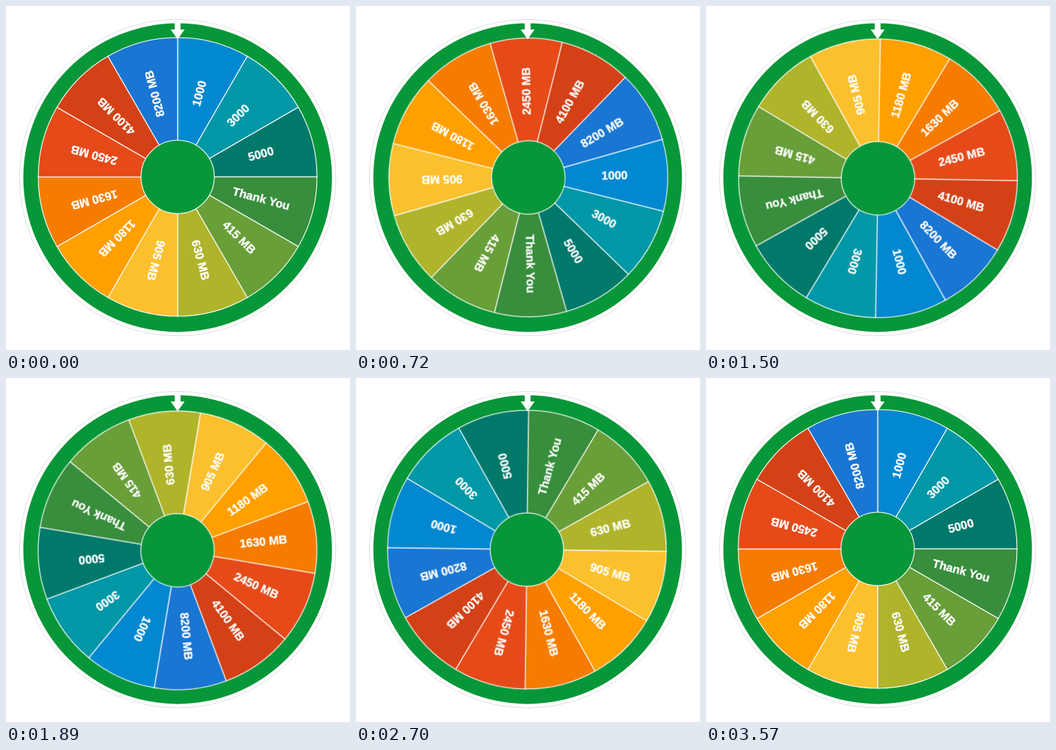
An HTML page for the animation above (3.6 s loop, 469 by 469 pixels).

```html
<!DOCTYPE html>
<html lang="en">
<head>
<meta charset="utf-8">
<title>Prize wheel</title>
<style>
  html, body { margin: 0; width: 100%; height: 100%; overflow: hidden; background: #fff; }
  svg { display: block; width: 469px; height: 469px; }
  .wheel { transform-origin: 0 0; animation: spin 3600ms infinite; }
  .wedge, .hub { stroke: #fff; stroke-width: 1.1; }
  .ring, .hub { fill: #079738; }
  .rim { fill: none; stroke: #ccc; stroke-width: .6; }
  text {
    font: bold 16px "Liberation Sans", Arial, sans-serif;
    fill: #fff; stroke: #fff; stroke-width: .35; text-anchor: middle;
  }

  /* one step every 30 ms, slightly slower through the middle of the turn */
  @keyframes spin {
    0%       { transform: rotate(0deg);     animation-timing-function: steps(15); }
    12.5%    { transform: rotate(46.6deg);  animation-timing-function: steps(18); }
    27.5%    { transform: rotate(101.6deg); animation-timing-function: steps(17); }
    41.6667% { transform: rotate(151deg);   animation-timing-function: steps(26); }
    63.3333% { transform: rotate(228.1deg); animation-timing-function: steps(28); }
    86.6667% { transform: rotate(313.4deg); animation-timing-function: steps(15); }
    99.1667%, 100% { transform: rotate(360deg); }
  }
</style>
</head>
<body>
<svg viewBox="0 0 469 469">
  <g transform="translate(234 234)">
    <circle class="rim" r="215.7"/>
    <circle class="ring" r="210.4"/>
    <g class="wheel">
      <g id="disc" transform="translate(0 -1)"></g>
    </g>
    <path fill="#fff" d="M-4-212.5H4V-202H9.5L0-188.5L-9.5-202H-4Z"/>
  </g>
</svg>
<script>
  const prizes = [
    ['1000', '#0288d1'], ['3000', '#0097a7'], ['5000', '#00796b'],
    ['Thank You', '#388e3c'], ['415 MB', '#689f38'], ['630 MB', '#afb42b'],
    ['905 MB', '#fbc02d'], ['1180 MB', '#ffa000'], ['1630 MB', '#f57c00'],
    ['2450 MB', '#e64a19'], ['4100 MB', '#d44116'], ['8200 MB', '#1976d2']
  ];
  const disc = document.getElementById('disc');
  const radius = 190, step = 360 / prizes.length;

  function add(tag, attrs, label = '') {
    const el = document.createElementNS('http://www.w3.org/2000/svg', tag);
    for (const name in attrs) el.setAttribute(name, attrs[name]);
    el.textContent = label;
    disc.append(el);
  }

  // angles run clockwise from the top
  function rimPoint(deg) {
    const a = deg * Math.PI / 180;
    return `${radius * Math.sin(a)} ${-radius * Math.cos(a)}`;
  }

  prizes.forEach(([, fill], i) => add('path', {
    class: 'wedge', fill,
    d: `M0 0L${rimPoint(i * step)}A${radius} ${radius} 0 0 1 ${rimPoint((i + 1) * step)}Z`
  }));
  prizes.forEach(([label], i) => add('text', {
    x: 117.7, y: 4.5, transform: `rotate(${(i + .5) * step - 90})`
  }, label));
  add('circle', { class: 'hub', r: 50 });
</script>
</body>
</html>
```
